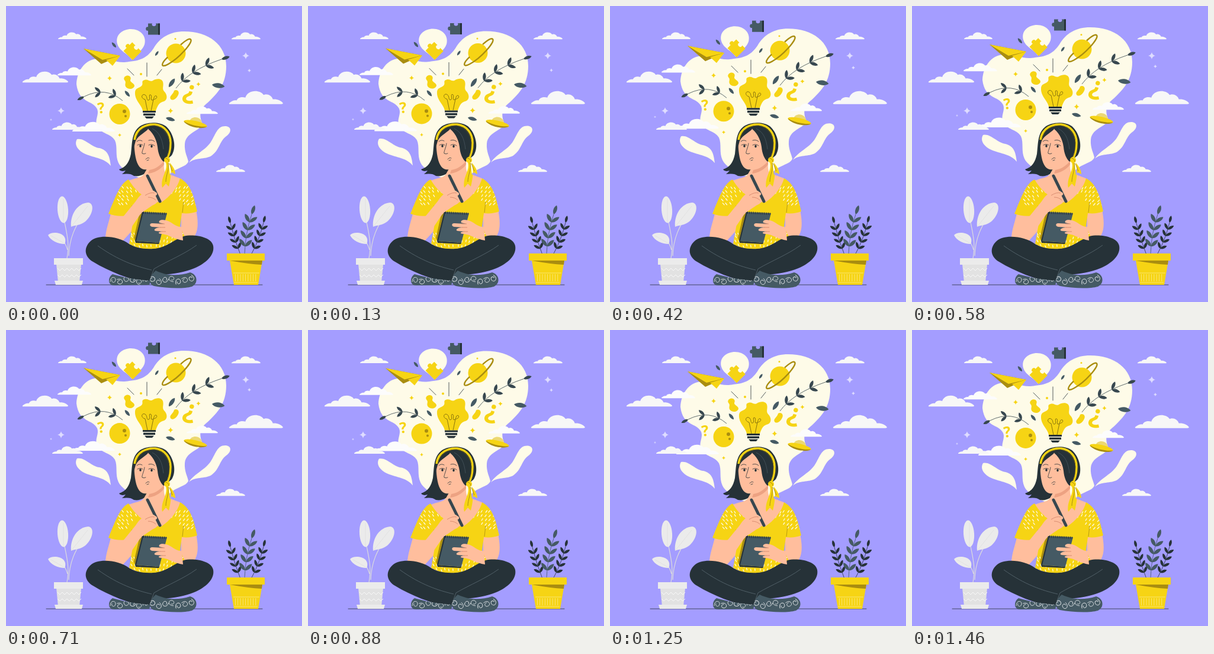
An HTML page that plays this animation: 500 by 500 pixels, repeating every 1500 ms.

```html
<!DOCTYPE html>
<html lang="en">
<head>
<meta charset="utf-8">
<title>Thinking up ideas</title>
<style>
html, body { margin: 0; height: 100%; overflow: hidden; background: #a49dff; }
svg { display: block; width: 100vw; height: 100vh; }
text { font: 700 25px "Open Sans", sans-serif; text-anchor: middle; }
.cream { fill: #fefbe8; }
.yellow { fill: #f6d414; }
.ochre { fill: #a98d10; }
.dark { fill: #263238; }
.slate { fill: #455a64; }
.skin { fill: #ffbe9d; }
.line { fill: none; stroke: #263238; stroke-width: .8; stroke-linecap: round; }
</style>
</head>
<body>
<svg viewBox="0 0 500 500">
  <defs>
    <path id="cloud" d="M0 23C5 19 9 17 14 18C16 12 25 11 30 13C34-1 56-3 64 8C70 5 79 9 81 16C88 15 96 18 100 23Q100 25 97 25L2 25Q-1 25 0 23Z"/>
    <path id="star" d="M0-6Q1-1 6 0Q1 1 0 6Q-1 1-6 0Q-1-1 0-6Z"/>
    <path id="piece" d="M-10-9H-3C-6-3 6-3 3-9H10V10H-10V3C-15 5-15-5-10-3Z"/>
    <path id="leaf" d="M0 0C4-4 12-4 16 0C12 4 4 4 0 0Z"/>
    <clipPath id="shirtClip"><use href="#shirt"/></clipPath>
    <clipPath id="shoesClip"><use href="#shoes"/></clipPath>
  </defs>

  <g id="idea">
    <path class="cream" d="M119 132C120 110 133 90 155 89C177 89 188 98 208 94C230 92 239 86 249 72C260 53 277 43 301 43C342 43 372 65 372 102C372 132 357 148 341 163C324 176 328 188 331 197C333 211 304 211 302 233C301 247 307 256 308 263C302 276 280 270 262 302C240 296 200 285 190 265C184 252 189 238 184 227C177 215 160 216 154 203C149 193 158 183 154 174C146 158 123 165 119 132Z"/>
    <path class="cream" d="M188 64C184 48 198 39 211 39C227 39 238 51 234 65C230 77 219 80 212 90C206 80 192 77 188 64Z"/>
    <path class="cream" d="M120 225C114 235 123 245 134 250C150 257 167 257 177 270C175 253 172 244 158 240C143 238 133 222 120 225Z"/>
    <path class="cream" d="M309 265C318 250 338 244 347 228C354 217 357 203 370 203C381 203 382 213 372 220C360 229 361 243 347 253C336 260 319 255 309 265Z"/>

    <use href="#piece" class="slate" transform="translate(250 38.5)"/>
    <path class="dark" d="M257 29.500h3v19h-3z"/>
    <use href="#piece" class="yellow" transform="translate(214 76) rotate(45) scale(1.1)"/>

    <path class="ochre" d="M131 72L161 98L193 84Z"/>
    <path class="yellow" d="M131 72L193 84L163 91ZM169 91L193 84L180 101Z"/>

    <circle class="yellow" cx="287" cy="80" r="16.500"/>
    <path d="M-15-3C-31-1-36 5-22 7C0 10 34 2 34-4C34-8 25-8 15-7" transform="translate(287 80) rotate(-36)" fill="none" stroke="#a98d10" stroke-width="2.400"/>

    <path class="line" d="M238 96V119M205 106L216 117M263 107L255 117"/>
    <path class="yellow" d="M231 177C229 166 217 160 218 145C219 138 225 139 229 135C233 131 227 127 234 125C240 123 243 129 248 126C254 122 263 122 265 128C267 135 263 139 267 144C273 150 273 158 267 161C258 163 256 169 253 177Z"/>
    <circle class="yellow" cx="228" cy="115" r="2"/>
    <path d="M239 177L235 158C225 155 231 146 236 151C239 154 237 160 241 159C245 158 240 149 244 150C248 151 243 160 247 159C251 159 249 150 254 152C257 156 250 158 249 158L245 177" fill="none" stroke="#7d690d" stroke-width=".9"/>
    <path class="dark" d="M231 177H253V180H231ZM232 181.500H252V185H232ZM234 186.500H250L247 190H237Z"/>

    <path class="yellow" d="M201 119C206 115 213 119 210 125C209 129 217 130 217 135C215 142 205 141 202 136C200 131 204 129 200 125Q198 122 201 119Z"/>
    <path class="yellow" d="M284 143C288 140 294 144 291 150C288 157 281 161 278 157C275 152 283 149 284 143Z"/>
    <text class="yellow" transform="translate(162 181) rotate(-8)">?</text>
    <text class="yellow" transform="translate(313 134) rotate(194) scale(1.75)">?</text>

    <circle class="yellow" cx="192" cy="182.500" r="17.500"/>
    <g class="ochre"><circle cx="200" cy="178" r="3"/><circle cx="202" cy="186" r="2"/></g>

    <g transform="translate(320 199) rotate(13)">
      <path d="M-11-2C-9-14 9-14 11-2Z" fill="#ecd873"/>
      <ellipse class="yellow" rx="20" ry="4.800"/>
      <path class="ochre" d="M-20 0C-10 4 10 4 20 0C14 8-14 8-20 0Z"/>
    </g>

    <g id="branches"></g>
    <g class="slate">
      <use href="#leaf" transform="translate(186 70) rotate(-130) scale(.7)"/>
      <use href="#leaf" transform="translate(252 84) rotate(-55) scale(.6)"/>
      <use href="#leaf" transform="translate(209 153) rotate(-130) scale(.8)"/>
      <use href="#leaf" transform="translate(270 189) rotate(15)"/>
      <use href="#leaf" transform="translate(275 137) rotate(-55) scale(1.1)"/>
      <use href="#leaf" transform="translate(348 133) rotate(8) scale(1.35)"/>
    </g>
    <g class="yellow">
      <use href="#star" transform="translate(175 122) scale(.7)"/>
      <use href="#star" transform="translate(325 132) scale(.6)"/>
      <use href="#star" transform="translate(278 177) scale(.8)"/>
      <use href="#star" transform="translate(192 218) scale(.5)"/>
      <circle cx="286" cy="55.500" r="1.500"/>
    </g>
    <circle cx="76" cy="192" r="1.500" fill="#cbc8ff"/>
    <use href="#star" transform="translate(411 109) scale(.5)" fill="#dedcff"/>
    <g fill="#fcfcfc">
      <use href="#cloud" transform="translate(87 103) scale(.57)"/>
      <use href="#cloud" transform="translate(305 169) scale(.53)"/>
      <use href="#cloud" transform="translate(112 195) scale(.72 .68)"/>
    </g>
  </g>

  <g fill="#f7f7f7">
    <use href="#cloud" transform="translate(88 44) scale(.48)"/>
    <use href="#cloud" transform="translate(381 44) scale(.49)"/>
    <use href="#cloud" transform="translate(28 110) scale(.77)"/>
    <use href="#cloud" transform="translate(377 143) scale(.91)"/>
    <use href="#cloud" transform="translate(355 268) scale(.49)"/>
    <use href="#cloud" transform="translate(78 196) scale(.52)"/>
  </g>
  <g fill="#dedcff">
    <use href="#star" x="93" y="177"/>
    <use href="#star" x="405" y="84"/>
  </g>

  <path class="line" d="M68 471H433"/>

  <g fill="#ebebeb">
    <path d="M103 426C108 400 102 382 97 355M106 422C107 390 118 372 130 352M104 412Q100 398 92 393" fill="none" stroke="#dcdcdc" stroke-width="1.200"/>
    <ellipse rx="9" ry="22.500" transform="translate(96 344) rotate(-4)"/>
    <path d="M110 373C108 352 121 333 139 332C151 334 146 354 134 364C125 371 116 370 110 373Z"/>
    <path d="M71 387C76 381 91 382 97 388C102 393 100 400 99 402C88 402 75 396 71 387Z"/>
    <path d="M97 365V326M110 373L138 338M76 388L97 400" fill="none" stroke="#dadada" stroke-width=".6"/>
    <path d="M85 436H127L124 467H88Z" fill="#e2e2e2"/>
    <path d="M81 426H130V437H81ZM82 464H130L128 471H84Z"/>
    <path id="zigzag" fill="none" stroke="#f7f7f7"/>
  </g>

  <g id="plant"></g>
  <path class="yellow" d="M378 430H433L426 471H385Z"/>
  <path class="ochre" d="M378 430H433L432 437Q410 436 378 430Z"/>
  <path class="yellow" d="M373 418H437V430H373Z"/>
  <g fill="none" stroke="#fbe98a">
    <path d="M384 451H428M385 467H425" stroke-width=".8"/>
    <path d="M387 459H425" stroke-width="12" stroke-dasharray=".8 3.500"/>
  </g>

  <!-- figure -->
  <path class="dark" d="M224 205C212 215 213 234 211 250C208 264 203 272 191 276C194 280 199 279 202 278C200 281 197 283 196 284C206 283 211 283 216 287C226 289 236 284 242 276L268 262L280 252C289 238 283 214 270 203C258 194 233 196 224 205Z"/>
  <path class="skin" d="M242 268L268 254C266 272 266 281 273 284C283 287 290 289 297 293L275 345H240L206 296C214 291 229 291 233 284Z"/>
  <path d="M242 277C252 276 261 269 267 262L267 268C260 277 250 282 240 283Z" fill="#eda282"/>

  <path class="skin" d="M178 347C174 365 168 379 168 393C169 406 184 409 196 398L249 340L220 332L206 357L211 345ZM296 344L321 344C324 360 326 376 319 388C309 401 287 403 270 396L268 376L296 374Z"/>
  <path id="shirt" class="yellow" d="M207 293C192 300 184 325 173 351C184 355 197 356 208 353L218 345L208 402C235 416 268 416 288 403L302 390L294 372L297 350C307 351 315 350 323 347C317 320 312 301 294 291C290 307 277 322 262 332C240 330 219 314 207 293Z"/>
  <g id="pattern" clip-path="url(#shirtClip)" stroke="#fefbe8" stroke-width="1.300" stroke-linecap="round"></g>
  <path d="M213 337L208 354M298 349L300 331" fill="none" stroke="#a98d10" stroke-width=".8"/>
  <path class="ochre" d="M226 348L231 350L219 397L216 392Z"/>
  <path class="skin" d="M169 392C180 377 202 351 219 330C225 320 234 313 243 311C252 309 259 317 259 322C260 329 254 334 247 337C240 342 231 347 226 353L198 394C187 407 168 408 169 392Z"/>

  <path class="skin" d="M222 210C215 222 216 240 219 256C222 271 229 278 238 276C249 274 258 265 264 256L268 238L250 206Z"/>
  <path class="dark" d="M216 239C212 217 225 204 243 204C237 214 224 217 219 228ZM238 206C247 213 254 223 256 238C257 250 261 258 266 263L279 253C288 237 281 212 268 203Z"/>
  <g fill="none">
    <path d="M217 226C220 205 238 199 252 200C269 202 278 216 278 231C278 245 275 253 271 259" stroke="#f6d414" stroke-width="3.500"/>
    <path d="M219 228C222 207 238 202 251 202C266 204 275 217 276 231C276 245 274 252 270 258" stroke="#7d690d" stroke-width=".7"/>
    <path d="M247 207C259 213 264 224 266 242" stroke="#52626a" stroke-width=".6"/>
  </g>
  <path class="yellow" d="M269 262C276 277 260 288 264 307L270 300L275 305C278 293 281 276 276 263ZM274 262C281 269 286 276 286 284L280 281L277 286Z"/>
  <circle class="yellow" cx="272" cy="260" r="5"/>
  <path d="M269 257q6 1 6 6M274 265C276 275 270 287 270 297M276 266L281 279" fill="none" stroke="#a98d10"/>
  <path class="line" d="M221 229Q225 225 230 228M241 227Q247 225 251 229" stroke-width="1.600"/>
  <path class="line" d="M234 232C233 240 229 246 230 249Q233 251 236 249M236 259Q239 255 242 257M238 261L241 260M222 235Q227 232 231 235M241 235Q246 232 251 236"/>
  <ellipse class="dark" cx="227" cy="236.500" rx="1.700" ry="2.200"/>
  <ellipse class="dark" cx="246" cy="237" rx="1.700" ry="2.200"/>

  <path class="dark" d="M208 402C191 389 156 385 143 397C130 409 133 424 147 432C175 449 207 461 241 469L253 453C276 455 300 450 318 443C337 435 353 421 350 405C347 389 315 385 300 389C281 396 270 409 249 410C231 411 218 408 208 402Z"/>
  <path d="M155 405C190 430 220 440 246 446M322 404C300 420 274 430 250 444L241 468" fill="none" stroke="#63737b" stroke-width=".7"/>
  <path id="shoes" class="slate" d="M180 453C172 458 171 472 183 472L242 471L245 464C219 462 197 458 180 453ZM253 447C243 455 239 470 250 473C271 477 300 478 314 474C326 468 323 453 311 450C290 457 269 455 253 447Z"/>
  <g id="curls" clip-path="url(#shoesClip)" fill="none" stroke="#e5e8ea" stroke-width=".9"></g>

  <path class="slate" d="M230 348L272 350L259 400L218 397Z"/>
  <path class="dark" d="M230 348L232 348.500L220 397L218 397ZM218 397L259 400L258 402L219 400Z"/>
  <path d="M232 349L271 351" stroke="#263238" stroke-width="4" stroke-dasharray="1.200 2"/>
  <path d="M239 287L260 330" stroke="#37474f" stroke-width="5" stroke-linecap="round"/>
  <path class="skin" d="M229 321C234 312 247 309 252 314C257 316 256 320 251 321L242 322C250 323 257 326 254 330C248 335 239 334 233 339Z"/>
  <path class="skin" d="M297 373C286 374 280 364 270 362C263 360 257 362 259 366L267 368L247 367C242 367 242 372 247 373L262 374C251 374 248 379 253 380L265 381C256 381 256 385 263 385C275 386 284 394 299 396Z"/>
  <path d="M235 320Q244 314 251 316M240 323Q248 323 253 328M259 368H268M260 374H269M263 381H270" fill="none" stroke="#cf8066" stroke-width=".8"/>
</svg>

<script>
const byId = id => document.getElementById(id);
const add = (id, markup) => byId(id).insertAdjacentHTML("beforeend", markup);

let seed = 7;
const random = () => (seed = seed * 16807 % 2147483647) / 2147483647;

// Stem as a quadratic curve with pairs of leaves and one leaf at the tip.
function sprig(id, color, [x0, y0], [cx, cy], [x1, y1], pairs, size) {
  let leaves = "";
  for (let i = 0; i <= pairs; i++) {
    const t = .2 + .8 * i / pairs, s = 1 - t;
    const x = s * s * x0 + 2 * s * t * cx + t * t * x1;
    const y = s * s * y0 + 2 * s * t * cy + t * t * y1;
    const angle = Math.atan2(s * (cy - y0) + t * (y1 - cy), s * (cx - x0) + t * (x1 - cx)) * 180 / Math.PI;
    for (const turn of i < pairs ? [-42, 42] : [0])
      leaves += `<use href="#leaf" transform="translate(${x} ${y}) rotate(${angle + turn}) scale(${size})"/>`;
  }
  add(id, `<g fill="${color}"><path d="M${x0} ${y0}Q${cx} ${cy} ${x1} ${y1}" fill="none" stroke="${color}" stroke-width=".8"/>${leaves}</g>`);
}
sprig("plant", "#263238", [396, 420], [386, 395], [379, 367], 4, .75);
sprig("plant", "#263238", [414, 420], [428, 395], [435, 366], 4, .75);
sprig("plant", "#455a64", [403, 420], [404, 385], [415, 352], 4, 1);
sprig("branches", "#37474f", [197, 160], [168, 135], [132, 153], 2, .8);
sprig("branches", "#37474f", [287, 139], [310, 108], [364, 90], 3, .9);

byId("zigzag").setAttribute("d", [443, 454].map(y => "M87 " + y + "l4 4 4-4".repeat(5)).join(""));

// Short strokes on the shoulders and along the hem, leaving the middle plain.
for (let y = 304; y < 412; y += 7)
  for (let x = 188; x < 322; x += 7)
    if (Math.hypot(x - 250, (y - 348) * 1.2) > 51 && (y < 336 || y > 375))
      add("pattern", `<path d="M${x + random() * 3} ${y + random() * 3}l${(250 - x) / 22} 3"/>`);

for (let i = 0; i < 13; i++)
  add("curls", `<path d="M-5 3C-5-7 5-6 4 0S-4 4-2-1" transform="translate(${181 + i * 11} ${463 + 3 * Math.sin(i * 2)}) rotate(${i * 70})"/>`);

function draw(now) {
  const lift = 4 - 4 * Math.cos(now % 1500 / 1500 * 2 * Math.PI);
  byId("idea").setAttribute("transform", `translate(0 ${-lift})`);
  requestAnimationFrame(draw);
}
requestAnimationFrame(draw);
</script>
</body>
</html>
```
